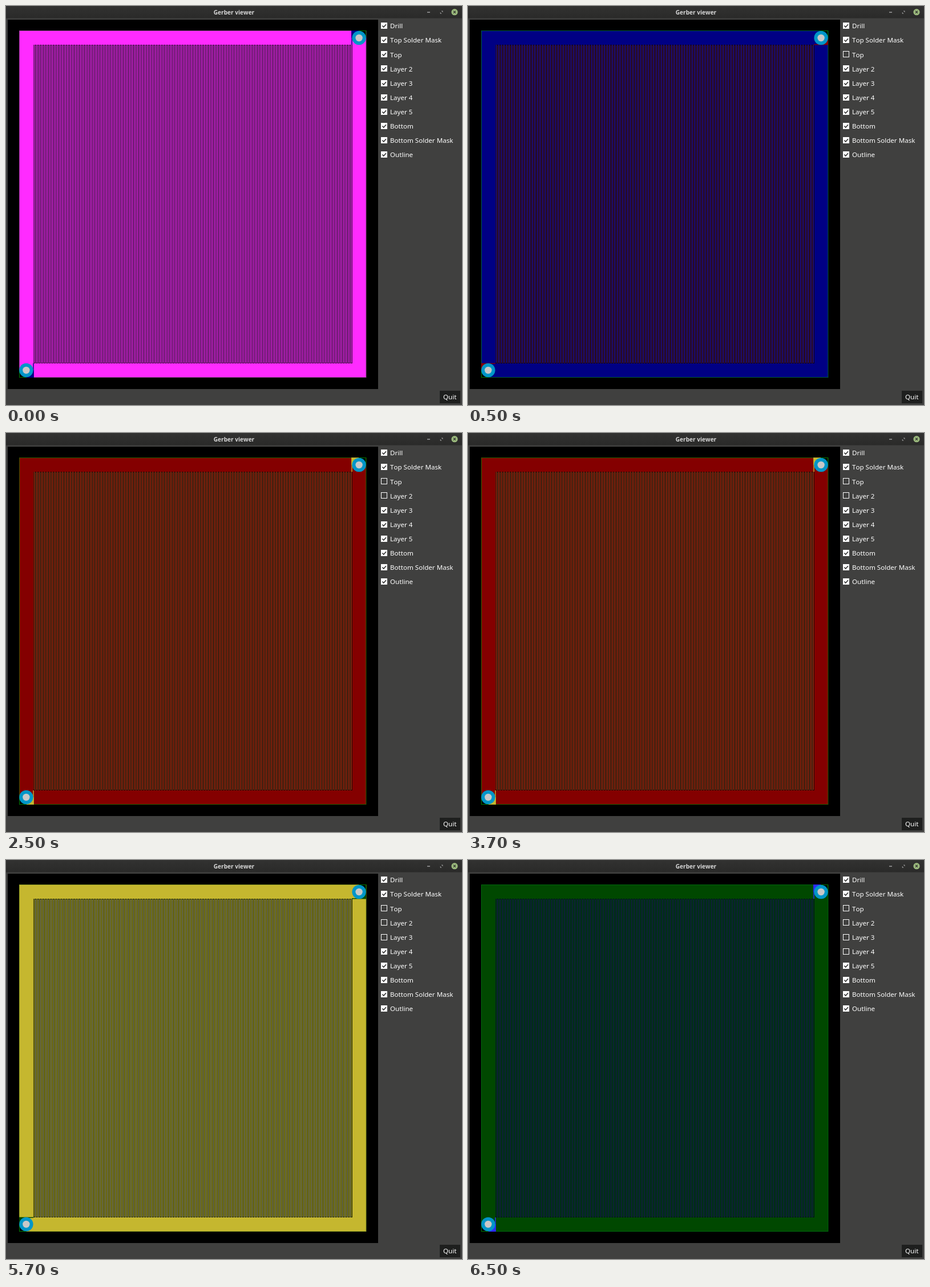
Recreate the animation shown at these times as an HTML page with a canvas. Size 799x700 px, loop 8000 ms.

```html
<!DOCTYPE html>
<html lang="en">
<head>
<meta charset="utf-8">
<title>Gerber viewer</title>
<style>
  html, body { margin: 0; width: 100%; height: 100%; overflow: hidden; background: #40403f; }
  canvas, svg { position: absolute; left: 0; top: 0; }
  text { font: 11.6px "Noto Sans", "Open Sans", sans-serif; font-kerning: none; fill: #fff; }
  .title { font-size: 10.1px; font-weight: 700; fill: #d6d6d6; text-anchor: middle; }
</style>
</head>
<body>
<canvas id="board" width="799" height="700"></canvas>
<svg id="ui" width="799" height="700" viewBox="0 0 799 700">
  <defs>
    <linearGradient id="bar" x2="0" y2="1">
      <stop stop-color="#323231"/><stop offset="1" stop-color="#2a2a29"/>
    </linearGradient>
  </defs>
  <rect width="799" height="21.5" fill="url(#bar)"/>
  <text class="title" x="399.5" y="15">Gerber viewer</text>
  <path d="M738 11h5" stroke="#bbb" stroke-width="1.2"/>
  <path d="M762.8 8.6h2.6v2.6zM760.8 10.8v2.6h2.6z" fill="#aaa"/>
  <circle cx="786" cy="10.7" r="5.6" fill="#9ab87c"/>
  <path d="M784 8.7l4 4m0-4l-4 4" stroke="#2b2b2a" stroke-width="1.2"/>
  <rect x="760" y="675" width="36" height="22" fill="#1e1f1e"/>
  <text x="766" y="690">Quit</text>
</svg>
<script>
const labels = ["Drill", "Top Solder Mask", "Top", "Layer 2", "Layer 3", "Layer 4",
  "Layer 5", "Bottom", "Bottom Solder Mask", "Outline"];
// Copper colour, board edge, the two comb colours and the gap between them
const layers = [
  { fill: "#ff2bff", edge: "#963c94", combs: ["#d728dc", "#a028a5"], gap: "#3c0a3e" },
  { fill: "#000084", edge: "#005a3c", combs: ["#281296", "#3c1232"], gap: "#0a0214" },
  { fill: "#840000", edge: "#305a00", combs: ["#a02d12", "#643219"], gap: "#1e0602" },
  { fill: "#c5b72f", edge: "#8c9c22", combs: ["#96911e", "#8c8c5a"], gap: "#1e2308" },
  { fill: "#004800", edge: "#00660c", combs: ["#004119", "#122d41"], gap: "#021216" },
  { fill: "#2c2cff" }
];
const ctx = document.getElementById("board").getContext("2d");
const ui = document.getElementById("ui");

function add(tag, attrs, text = "") {
  const el = document.createElementNS("http://www.w3.org/2000/svg", tag);
  for (const key in attrs) el.setAttribute(key, attrs[key]);
  el.textContent = text;
  return ui.appendChild(el);
}

const ticks = labels.map((label, i) => {
  const y = 35 + i * 25.13, top = Math.round(y) - 5.5;
  add("rect", { x: 657.5, y: top, width: 10, height: 10, fill: "none", stroke: "#fff" });
  const tick = add("g", {});
  tick.append(
    add("rect", { x: 657, y: top - 0.5, width: 11, height: 11, fill: "#fff" }),
    add("path", { d: `M659.3 ${top + 5}l2.4 2.5l4.3-4.8`, fill: "none", stroke: "#333", "stroke-width": 1.6 })
  );
  add("text", { x: 673, y: y + 4.3 }, label);
  return tick;
});

function rect(color, x, y, w, h) {
  ctx.fillStyle = color;
  ctx.fillRect(x, y, w, h);
}

function disc(color, r) {
  ctx.fillStyle = color;
  ctx.beginPath();
  ctx.arc(618.6, 56, r, 0, 7);
  ctx.fill();
}

// Pad in the top right corner; the isolating slit alternates between layers
function pad(under, slitLeft) {
  if (slitLeft) {
    rect(under, 605.3, 43, 13.2, 13);
    rect(under, 605.3, 43, 1.4, 25);
  } else {
    rect(under, 618.5, 56, 12.5, 12);
    rect(under, 606, 67, 25, 1.4);
  }
  rect("#000", 618.5, 43, 12.5, 13);
  rect("#007800", 618.5, 43, 12.5, 1);
  rect("#007800", 630, 43, 1, 13);
  disc("#0096c8", 12.2);
  disc("#c8c8c8", 6.2);
}

function drawBoard(n) {
  const { fill, edge, combs, gap } = layers[n];
  rect("#000", 3, 24, 649, 648);
  rect(edge, 23, 43, 608.4, 609);
  rect(fill, 24, 44, 606.4, 607);

  rect(gap, 48, 68, 559, 559);
  const pitch = 558 / 247;
  for (let i = 0; i < 247; i++)
    rect(combs[i % 2], 48.8 + i * pitch, i % 2 ? 69 : 68, 1.42, 558);

  for (let turn = 0; turn < 2; turn++) {
    pad(layers[n + 1].fill, n % 2 === 0);
    ctx.translate(654, 695);
    ctx.rotate(Math.PI);
  }
  ctx.resetTransform();
}

let shown = -1;
function tick(now) {
  const n = Math.floor((now % 8000 + 1500) / 2000);
  if (n !== shown) {
    shown = n;
    drawBoard(n);
    ticks.forEach((el, i) => el.setAttribute("visibility", i >= 2 && i < 2 + n ? "hidden" : "visible"));
  }
  requestAnimationFrame(tick);
}
tick(0);
</script>
</body>
</html>
```
